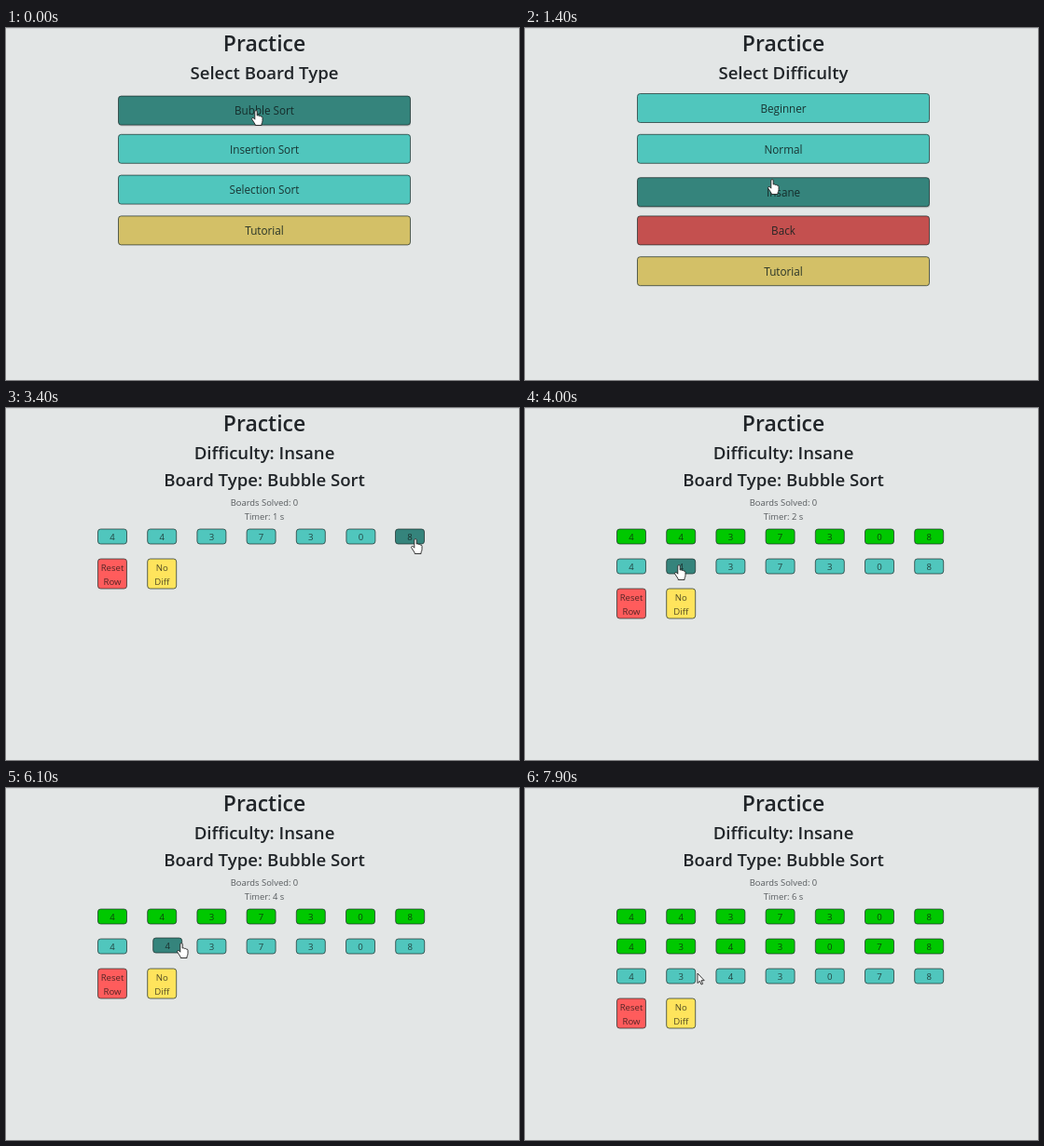
Write an HTML page that moves like this. It is 550 px wide and 378 px high and loops after 8 s.

```html
<!DOCTYPE html>
<html lang="en">
<head>
<meta charset="utf-8">
<title>Sorting practice</title>
<style>
  html, body { margin: 0; width: 100%; height: 100%; overflow: hidden; background: #e3e6e6; }
  svg { display: block; width: 550px; height: 378px; }
  text {
    font-family: "Open Sans", "Noto Sans", sans-serif;
    font-variant-ligatures: none;
    text-anchor: middle;
    fill: #212529;
  }
  .title { font-size: 23px; font-weight: 600; }
  .head { font-size: 18.6px; font-weight: 600; }
  .info { font-size: 9.4px; fill: #565a5d; }
  .label { font-size: 11.7px; fill: #10201f; fill-opacity: .88; }
  .small { font-size: 9.6px; fill: #111; fill-opacity: .72; }
  .box { stroke: #1c2b2a; stroke-opacity: .7; }
  .cursor { fill: #fff; stroke: #222; stroke-width: .9; stroke-linejoin: round; }
</style>
</head>
<body>
<svg id="stage" viewBox="0 0 550 378"></svg>
<script>
const LOOP = 8000, TICK = 100, MID = 277;
const LEVELS_AT = 100, BOARD_AT = 1500, NEW_ROWS = [3600, 7300];
const TEAL = '#50c6bd', DARK = '#35847c', RED = '#c4504f', GOLD = '#d3c067', GREEN = '#00c800';
const LEFT = 98.5, STEP = 53.2, TILE_W = 31, TILE_H = 16, TOP = 130, ROW_GAP = 32;

const START = [8, 4, 4, 3, 7, 3, 0];
const DRAGS = [
  { row: 0, from: 0, to: 6, begin: 2700, end: 3500 },
  { row: 1, from: 1, to: 2, begin: 6000, end: 6500 },
  { row: 1, from: 3, to: 5, begin: 6700, end: 7200 }
];
// pointer stops: time, x, y
const PATH = [
  [0, 268, 89], [600, 268, 89], [1200, 265, 163], [1700, 265, 163],
  [2400, 120, 141], [2700, 120, 141], [3000, 250, 146], [3400, 439, 141], [3500, 439, 141],
  [4000, 165, 169], [4500, 165, 169], [4800, 118, 170], [5100, 118, 170],
  [5500, 182, 168], [6000, 182, 168], [6100, 188, 167], [6500, 235, 168],
  [6700, 274, 170], [7200, 380, 170], [7300, 380, 170], [7800, 185, 199], [8000, 185, 199]
];
const HAND = 'M-1.2.8a1.2 1.2 0 0 1 2.4 0V5q1.2-.6 2 .4 1.3-.5 1.9.6 1.9-.3 1.9 1.4v3.1q0 2-1 3.4v1.6H-.8v-1L-4 9.5Q-5 8-3.8 7.5T-1.2 9.2Z';
const ARROW = 'M0 0V10.5l2.4-2.2 1.6 3.7 1.6-.7-1.6-3.6h3.2Z';

const stage = document.getElementById('stage');
const clamp = v => Math.min(1, Math.max(0, v));
const text = (cls, x, y, s) => `<text class="${cls}" x="${x}" y="${y}">${s}</text>`;
const box = (x, y, w, h, fill) =>
  `<rect class="box" x="${x}" y="${y}" width="${w}" height="${h}" rx="3" fill="${fill}"/>`;
const inside = (p, x, y, w, h) => p.x >= x && p.x <= x + w && p.y >= y && p.y <= y + h;

function pointer(t) {
  const i = Math.max(1, PATH.findIndex(k => k[0] >= t));
  const [t0, x0, y0] = PATH[i - 1], [t1, x1, y1] = PATH[i];
  const u = clamp((t - t0) / (t1 - t0)), e = u * u * (3 - 2 * u);
  return { x: x0 + (x1 - x0) * e, y: y0 + (y1 - y0) * e };
}

function menu(t, p) {
  const levels = t >= LEVELS_AT;
  const items = levels
    ? [['Beginner', TEAL], ['Normal', TEAL], ['Insane', TEAL], ['Back', RED], ['Tutorial', GOLD]]
    : [['Bubble Sort', TEAL], ['Insertion Sort', TEAL], ['Selection Sort', TEAL], ['Tutorial', GOLD]];
  const pressed = t < LEVELS_AT || t >= 1300;
  let hover = false;
  let out = text('head', MID, 55, levels ? 'Select Difficulty' : 'Select Board Type');
  items.forEach(([name, fill], i) => {
    let y = 70.5 + i * 43.8;
    if (inside(p, 120, y, 314, 31)) {
      hover = true;
      fill = DARK;
      if (pressed) y += 2.6;
      out += `<rect x="121" y="${y + 1.5}" width="313" height="31" rx="3" opacity=".15"/>`;
    }
    out += box(120.5, y, 313, 31, fill) + text('label', MID, y + 20.3, name);
  });
  return { out, hover };
}

function rowValues(row, t) {
  const list = [...START];
  for (const d of DRAGS)
    if (d.row <= row && d.end <= t) list.splice(d.to, 0, list.splice(d.from, 1)[0]);
  return list;
}

function tile(x, y, value, fill) {
  return box(x, y, TILE_W, TILE_H, fill) + text('small', x + TILE_W / 2, y + 11.5, value);
}

function actionButton(x, y, fill, a, b) {
  return box(x, y, TILE_W, 32, fill) +
    text('small', x + TILE_W / 2, y + 12.6, a) + text('small', x + TILE_W / 2, y + 27.6, b);
}

function board(t, p) {
  const last = NEW_ROWS.filter(n => t >= n).length;
  const drag = DRAGS.find(d => t >= d.begin && t < d.end);
  const grab = drag && pointer(drag.begin);
  const moved = drag ? (p.x - grab.x) / STEP : 0;
  let hover = !!drag, held = '';
  let out = text('head', MID, 55, 'Difficulty: Insane') +
    text('head', MID, 84, 'Board Type: Bubble Sort') +
    text('info', MID, 105, 'Boards Solved: 0') +
    text('info', MID, 120, `Timer: ${Math.floor((t - BOARD_AT) / 1000)} s`);

  for (let row = 0; row <= last; row++) {
    const y = TOP + row * ROW_GAP;
    rowValues(row, t).forEach((value, i) => {
      let x = LEFT + i * STEP;
      if (row < last) {
        out += tile(x, y, value, GREEN);
      } else if (drag && i === drag.from) {
        held = tile(x + p.x - grab.x, y + p.y - grab.y, value, DARK);
      } else {
        // neighbours make room once the held tile is halfway over them
        if (drag && i > drag.from) x -= STEP * clamp((moved - (i - drag.from) + .5) * 2);
        const over = !drag && inside(p, x, y, TILE_W, TILE_H);
        hover = hover || over;
        out += tile(x, y, value, over ? DARK : TEAL);
      }
    });
  }
  const y = TOP + (last + 1) * ROW_GAP;
  out += actionButton(LEFT, y, '#ff5c5c', 'Reset', 'Row') +
    actionButton(LEFT + STEP, y, '#ffe45c', 'No', 'Diff') + held;
  return { out, hover };
}

function draw(t) {
  const p = pointer(t);
  const { out, hover } = t < BOARD_AT ? menu(t, p) : board(t, p);
  stage.innerHTML = '<rect width="550" height="378" fill="#e3e6e6"/><rect width="550" height="1" fill="#cfd3d5"/>' +
    text('title', MID, 25, 'Practice') + out +
    `<path class="cursor" transform="translate(${p.x} ${p.y})" d="${hover ? HAND : ARROW}"/>`;
}

let shown = -1;
const origin = performance.now();
function loop() {
  const t = Math.floor((performance.now() - origin) % LOOP / TICK) * TICK;
  if (t !== shown) draw(shown = t);
  requestAnimationFrame(loop);
}
loop();
</script>
</body>
</html>
```
